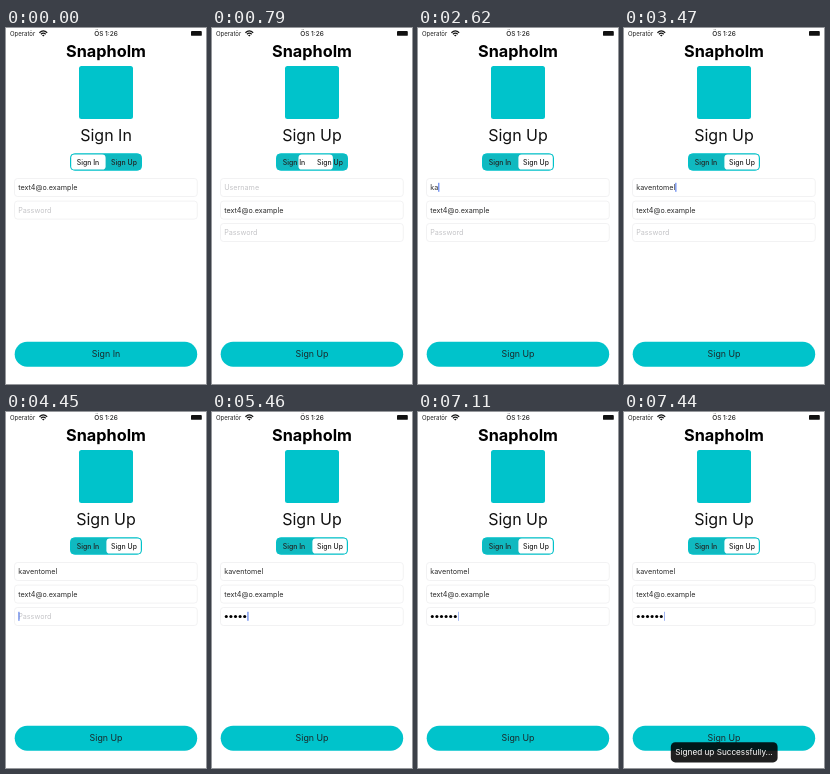
Animation, 200 px wide and 356 px high, one loop 8000 ms. Source, as an HTML page:

```html
<!DOCTYPE html>
<html lang="en">
<head>
<meta charset="utf-8">
<title>Sign up form</title>
<style>
  html, body { margin: 0; width: 100%; height: 100%; overflow: hidden; background: #fff; }
  svg { display: block; width: 100vw; height: 100vh; font-family: Inter, "Open Sans", sans-serif; }
  .mid { text-anchor: middle; }
  .field rect { fill: #fff; stroke: #ececee; stroke-width: .7; }
  .field text { font-size: 7.2px; fill: #2b2b2b; }
  .field .hint { fill: #c4c4c7; }
  .field .caret { fill: #2c5be8; stroke: none; }
</style>
</head>
<body>
<svg viewBox="0 0 200 356">
  <rect width="200" height="356" fill="#fff"/>

  <g fill="#222">
    <text x="4" y="7.8" font-size="6">Operatör</text>
    <text class="mid" x="100" y="7.8" font-size="6.5" font-weight="500">ÖS 1:26</text>
    <path d="M33.4 4.7Q37.3 1.2 41.2 4.7M34.9 6.2Q37.3 4.1 39.7 6.2" fill="none" stroke="#111" stroke-width="1.2"/>
    <path d="M36 7.2Q37.3 6.2 38.6 7.2L37.3 8.6Z" fill="#111"/>
    <rect x="185" y="3" width="10.8" height="4.8" rx=".9" fill="#111"/>
  </g>

  <text class="mid" x="100" y="29.2" font-size="16.3" font-weight="700">Snapholm</text>
  <rect x="73" y="38" width="54" height="53" rx="2.5" fill="#00c3cb"/>
  <text class="mid action" x="100" y="112.8" font-size="16" fill="#111"></text>

  <rect x="64.5" y="125.8" width="71" height="16.4" rx="4" fill="#10b9c0" stroke="#00c3cb"/>
  <rect id="thumb" y="126.4" width="34.4" height="15.2" rx="3.4" fill="#fff"/>
  <g class="mid" font-size="6.9" font-weight="500" fill="#222">
    <text x="82" y="136.5">Sign In</text>
    <text x="118" y="136.5">Sign Up</text>
  </g>

  <g id="fields"></g>

  <g id="button">
    <rect x="8.7" y="313.8" width="182.5" height="24.9" rx="12.4" fill="#00c3cb"/>
    <text class="mid action" x="100" y="329.3" font-size="8.8" fill="#1a2a2c"></text>
  </g>

  <g id="toast">
    <rect x="46.8" y="330.2" width="106.8" height="20.2" rx="4.5" fill="#000" fill-opacity=".88"/>
    <text class="mid" x="100" y="343.3" font-size="8.2" fill="#fff">Signed up Successfully...</text>
  </g>
</svg>
<script>
const LOOP = 8000, SWITCH = 640, LEFT = 12.2, DOT_PITCH = 4.6;
const USERNAME = "kaventomel", EMAIL = "text4@o.example";

// [time, characters entered]
const nameKeys = [[2620, 2], [2740, 4], [2900, 5], [3070, 6], [3180, 7], [3320, 9], [3470, 10]];
const passwordKeys = [[4770, 1], [5060, 3], [5280, 4], [5460, 5], [5740, 6]];

const byId = id => document.getElementById(id);
const actions = document.querySelectorAll(".action");

function add(parent, tag, attributes, text = "") {
  const node = document.createElementNS("http://www.w3.org/2000/svg", tag);
  for (const key in attributes) node.setAttribute(key, attributes[key]);
  node.textContent = text;
  return parent.appendChild(node);
}

function makeField(hint, value = "") {
  const group = add(byId("fields"), "g", { class: "field" });
  add(group, "rect", { x: 8.5, y: .5, width: 182.8, height: 18, rx: 3 });
  return {
    group,
    hint: add(group, "text", { class: "hint", x: LEFT, y: 12 }, hint),
    value: add(group, "text", { x: LEFT, y: 12 }, value),
    caret: add(group, "rect", { class: "caret", y: 4.8, width: .9, height: 9 })
  };
}

const username = makeField("Username");
const email = makeField("", EMAIL);
const password = makeField("Password");

const dots = Array.from({ length: 6 }, (_, i) =>
  add(password.group, "circle", { cx: LEFT + 2.1 + i * DOT_PITCH, cy: 9.5, r: 1.55, fill: "#000" }));

const ramp = (t, from, to) => Math.min(1, Math.max(0, (t - from) / (to - from)));
const ease = p => p * p * (3 - 2 * p);
const within = (t, from, to) => t >= from && t < to ? 1 : 0;
const entered = (keys, t) => keys.reduce((count, [time, n]) => t >= time ? n : count, 0);

function show(node, opacity) { node.setAttribute("opacity", opacity); }
function place(field, y) { field.group.setAttribute("transform", `translate(0 ${y})`); }
function setCaret(field, x, opacity) {
  field.caret.setAttribute("x", x);
  show(field.caret, opacity);
}
function textEnd(field, length) {
  return LEFT + (length ? field.value.getSubStringLength(0, length) : 0) + .2;
}

function passwordCaret(t) {
  if (t < 4450) return 0;
  if (t < 5740) return 1;
  if (t < 6990) return .75 * (1 - ramp(t, 6280, 6460));
  return .5 * ramp(t, 6940, 7120);
}

function draw(t) {
  const signingUp = t >= SWITCH;
  actions.forEach(node => node.textContent = signingUp ? "Sign Up" : "Sign In");
  byId("thumb").setAttribute("x", 65.2 + 35.2 * ease(ramp(t, 580, 950)));

  place(username, 150);
  place(email, signingUp ? 172.6 : 150);
  place(password, signingUp ? 195 : 172.6);
  show(username.group, signingUp ? 1 : 0);

  const typed = entered(nameKeys, t);
  username.value.textContent = USERNAME.slice(0, typed);
  show(username.hint, typed ? 0 : 1);
  setCaret(username, textEnd(username, typed), within(t, 1910, 4130) + within(t, 4330, 4450));
  setCaret(email, textEnd(email, 5), within(t, 1010, 1600) + .4 * within(t, 1600, 1720));

  const hidden = entered(passwordKeys, t);
  dots.forEach((dot, i) => show(dot, i < hidden ? 1 : 0));
  show(password.hint, hidden ? 0 : 1);
  setCaret(password, LEFT + hidden * DOT_PITCH + .3, passwordCaret(t));

  show(byId("button"), t >= 5740 ? .5 + .5 * ramp(t, 5840, 5950) : 1);
  show(byId("toast"), ramp(t, 7120, 7420));
}

const start = performance.now();
function tick() {
  draw((performance.now() - start) % LOOP);
  requestAnimationFrame(tick);
}
tick();
</script>
</body>
</html>
```
